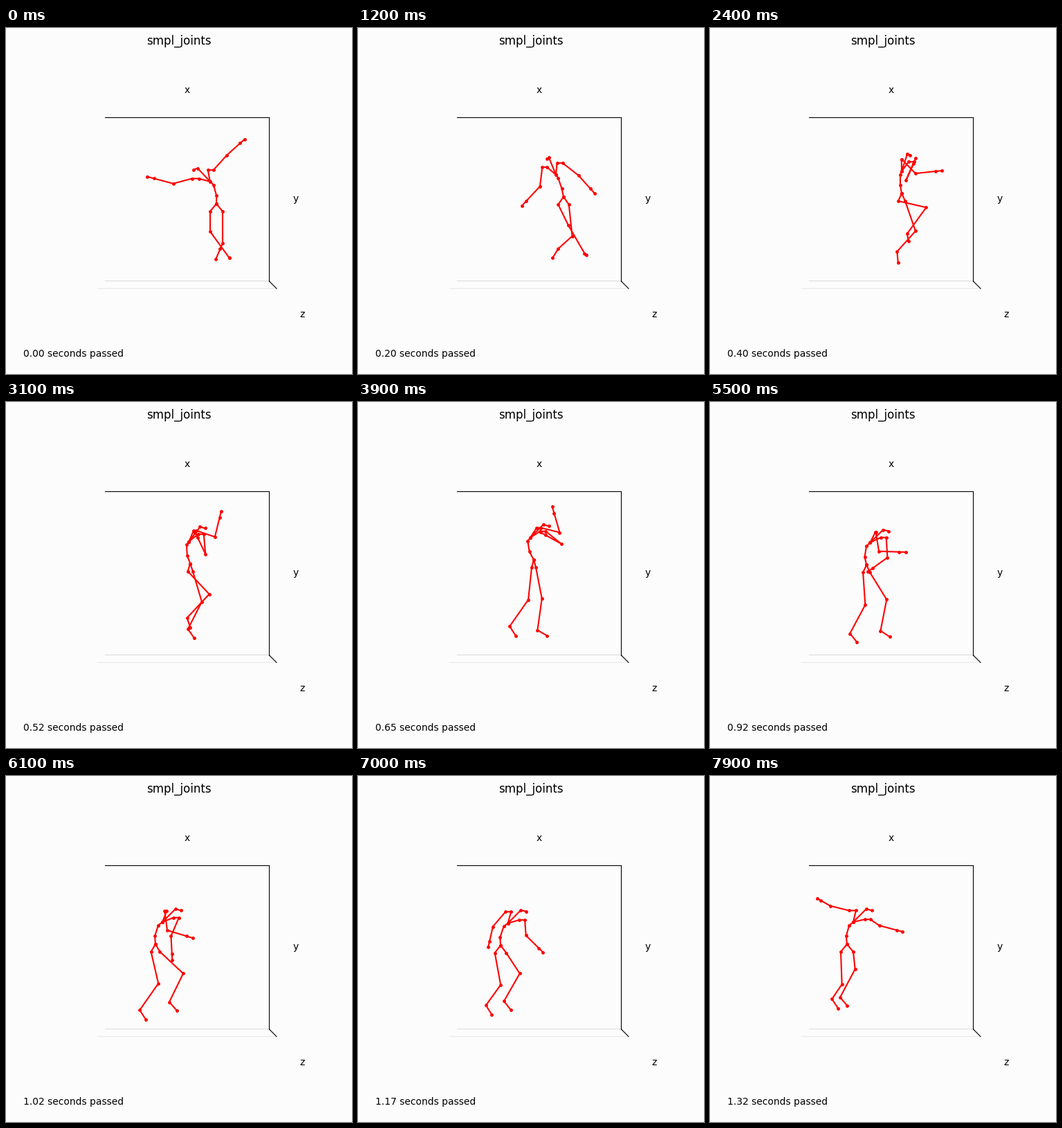
Animation, 500 px wide and 500 px high, one loop 8000 ms. Source, as a matplotlib script:

```python
import numpy as np
import matplotlib.pyplot as plt
from matplotlib.animation import FuncAnimation

SIZE, DPI = 500, 100
FRAMES, INTERVAL, FPS = 80, 100, 60
BACK = "#fcfcfc"

KEYS = np.array([0, 12, 24, 39, 48, 61, 79], float)
step = np.arange(FRAMES)


def track(*values):
    """Cubic Hermite curve through one value per key time."""
    v = np.array(values, float)
    m = np.gradient(v, KEYS)
    i = np.clip(np.searchsorted(KEYS, step, side="right") - 1, 0, len(KEYS) - 2)
    h = KEYS[i + 1] - KEYS[i]
    u = (step - KEYS[i]) / h
    return (v[i] * (1 + 2 * u) * (1 - u) ** 2 + v[i + 1] * u ** 2 * (3 - 2 * u)
            + h * u * (1 - u) * (m[i] * (1 - u) - m[i + 1] * u))


def ease(start, end):
    u = np.clip((step - start) / (end - start), 0, 1)
    return u * u * (3 - 2 * u)


def bone(angle, length):
    """Vector as x + iy; 0 degrees points right, 90 down the screen."""
    return length * np.exp(1j * np.radians(angle))


# The dancer turns to profile, then twists back at the end.
turn = ease(0, 38)
fold = 1 - 0.45 * ease(61, 79)
sway = np.cos(2 * np.pi * step / KEYS[-1])

# Torso
pelvis = (track(304, 297, 277, 254, 239, 216, 198)
          + 1j * track(254, 244, 239, 228, 227, 243, 243))
spine = track(-9, -11, 0, -5, -1, 10, 9) - 32j
bow = 3.5 - 8 * turn
chest = pelvis + spine
tilt = -43 + 88 * turn
neck = chest + bone(tilt - 90, 26.5)
head = neck + 10 * np.sin(np.radians(tilt)) + 1 + 2j
torso = [pelvis, pelvis + 0.36 * spine + bow, pelvis + 0.85 * spine + bow,
         chest, neck, head]


def leg(side, thigh, shin, thigh_len, shin_len, foot_len):
    hip = pelvis + side * (6 + 3 * sway) + 11j
    knee = hip + bone(thigh, thigh_len)
    ankle = knee + bone(shin, shin_len)
    foot = ankle + bone(shin - 68 * turn, foot_len)
    return [pelvis, hip, knee, ankle, foot]


def arm(side, reach, upper, fore, upper_len, fore_len):
    collar = chest + bone(tilt + side * (22 + 10 * sway) - 90, 17)
    shoulder = collar + reach
    elbow = shoulder + bone(upper, upper_len)
    forearm = bone(fore, fore_len)
    return [chest, collar, shoulder, elbow,
            elbow + forearm, elbow + 1.33 * forearm]


chains = [
    leg(-1, track(90, 64, 13, 96, 97, 77, 88),
        track(54, 60, 126, 125, 113, 125, 124),
        47 * (0.62 + 0.38 * turn), 47 * fold, 16 * turn),
    leg(1, track(90, 84, 71, 79, 79, 43, 84),
        track(113, 138, 132, 98, 87, 116, 118),
        46 * fold, 46 * (0.2 + 0.8 * np.sqrt(turn)), 16),
    torso,
    arm(-1, -2 - 8 * sway, track(165, 97, 46, 14, 76, 82, 194),
        track(195, 133, -6, -106, -17, 17, 210), 28, 29 * fold),
    arm(1, 8, track(-48, 38, 114, 39, 48, 113, 34),
        track(-42, 48, -66, -151, -157, -273, -345), 29 * fold, 26),
]

fig = plt.figure(figsize=(SIZE / DPI, SIZE / DPI), dpi=DPI, facecolor=BACK)
fig.suptitle("smpl_joints", fontsize=12)
ax = fig.add_axes([0, 0, 1, 1])
ax.set(xlim=(0, SIZE), ylim=(SIZE, 0))
ax.axis("off")

for xs, ys, color in (((143, 380), (365, 365), "#dcdcdc"),
                      ((132, 391), (376, 376), "#e9e9e9"),
                      ((143, 380), (129, 129), "black"),
                      ((380, 380), (129, 366), "black"),
                      ((380.5, 391), (366, 376.5), "black")):
    ax.plot(xs, ys, color=color, lw=0.8)

for name, x, y in (("x", 262, 94), ("y", 419, 250.5), ("z", 428.5, 418)):
    ax.text(x, y, name, fontsize=10, ha="center", va="baseline")
clock = ax.text(25, 475, "", fontsize=10)
bones = [ax.plot([], [], color="red", lw=1.5, marker=".", ms=5)[0]
         for _ in chains]


def draw(n):
    for line, chain in zip(bones, chains):
        points = np.array([joint[n] for joint in chain])
        line.set_data(points.real, points.imag)
    clock.set_text(f"{n / FPS:.2f} seconds passed")
    return [*bones, clock]


anim = FuncAnimation(fig, draw, frames=FRAMES, interval=INTERVAL,
                     repeat=True, repeat_delay=0)
plt.show()
```
